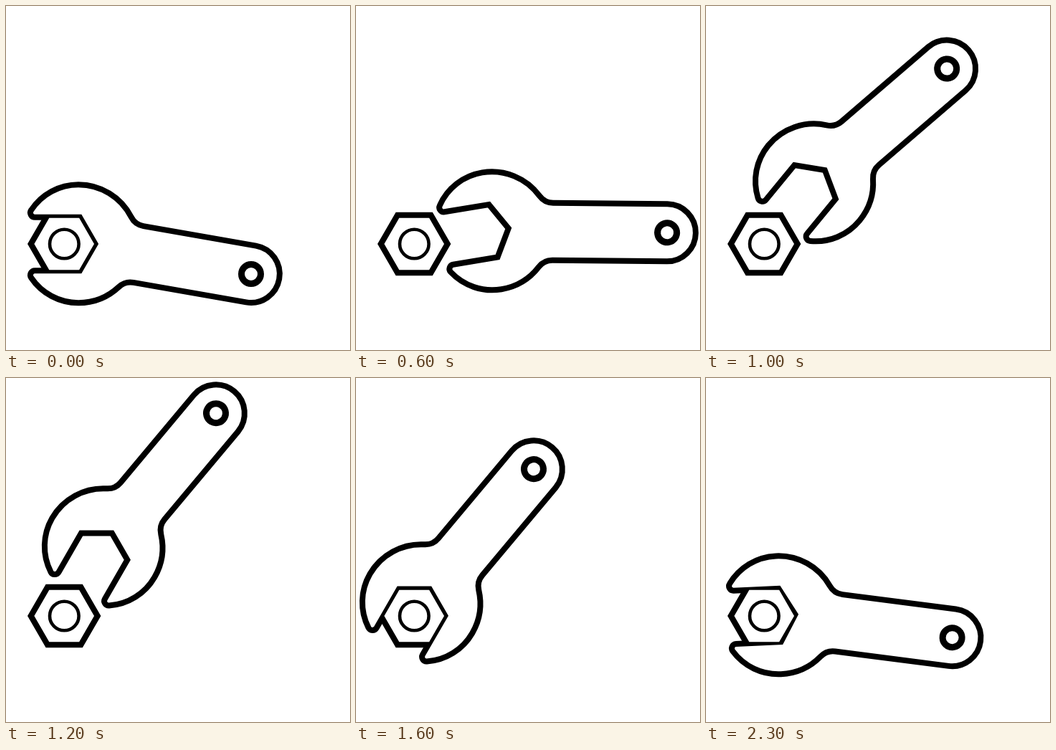
An HTML page that plays this animation: 480 px wide and 480 px high, repeating every 2400 ms.

```html
<!DOCTYPE html>
<html lang="en">
<head>
<meta charset="utf-8">
<title>Wrench and nut</title>
<style>
  html, body { margin: 0; width: 100%; height: 100%; overflow: hidden; background: #fff; }
  svg { display: block; width: 100vw; height: 100vh; }
</style>
</head>
<body>
<svg viewBox="0 0 480 480">
  <polygon id="rim"/>
  <g id="wrench" fill="#fff" stroke="#000" stroke-width="8">
    <path d="M40.2 294.8 H103 L124.5 332 L103 369.2 H40.2
      A6.3 6.3 0 0 0 35.1 379.1 A79.4 79.4 0 0 0 101 414.2
      A82.5 82.5 0 0 0 157.4 392 A24 24 0 0 1 178 385.9
      L335.1 413.4 A40 40 0 0 0 348.9 334.6
      L191.8 307.1 A24 24 0 0 1 174.6 294.3
      A82.5 82.5 0 0 0 101 249.2 A78.7 78.7 0 0 0 35.1 284.9
      A6.3 6.3 0 0 0 40.2 294.8 Z"/>
    <circle cx="342" cy="374" r="13.5" stroke-width="9"/>
  </g>
  <!-- The nut's face lies above the wrench, its rim below. -->
  <polygon id="face" fill="#fff"/>
  <circle cx="81.3" cy="332" r="20.3" fill="none" stroke="#000" stroke-width="4.6"/>
</svg>
<script>
const LOOP = 2400, STEP = 100, REACH = 90, TURN = -60;
const NUT = { x: 81.2, y: 332 };
const byId = id => document.getElementById(id);

function hexagon(id, radius) {
  const points = Array.from({ length: 6 }, (_, i) => {
    const a = i * Math.PI / 3;
    return [NUT.x + radius * Math.cos(a), NUT.y + radius * Math.sin(a)];
  });
  byId(id).setAttribute('points', points.join(' '));
}

// Eased progress from 0 to 1 between two times.
function ease(t, start, end) {
  const p = Math.min(1, Math.max(0, (t - start) / (end - start)));
  return p * p * (3 - 2 * p);
}

function draw(now) {
  const t = Math.floor(now % LOOP / STEP) * STEP;
  const slide = REACH * (ease(t, 0, 400) - ease(t, 1200, 1600));
  const angle = TURN * (ease(t, 400, 1200) - ease(t, 1600, 2400));
  byId('wrench').setAttribute('transform',
    `rotate(${angle} ${NUT.x} ${NUT.y}) translate(${slide} 0)`);
  requestAnimationFrame(draw);
}

hexagon('rim', 51.2);
hexagon('face', 41.8);
draw(0);
</script>
</body>
</html>
```
